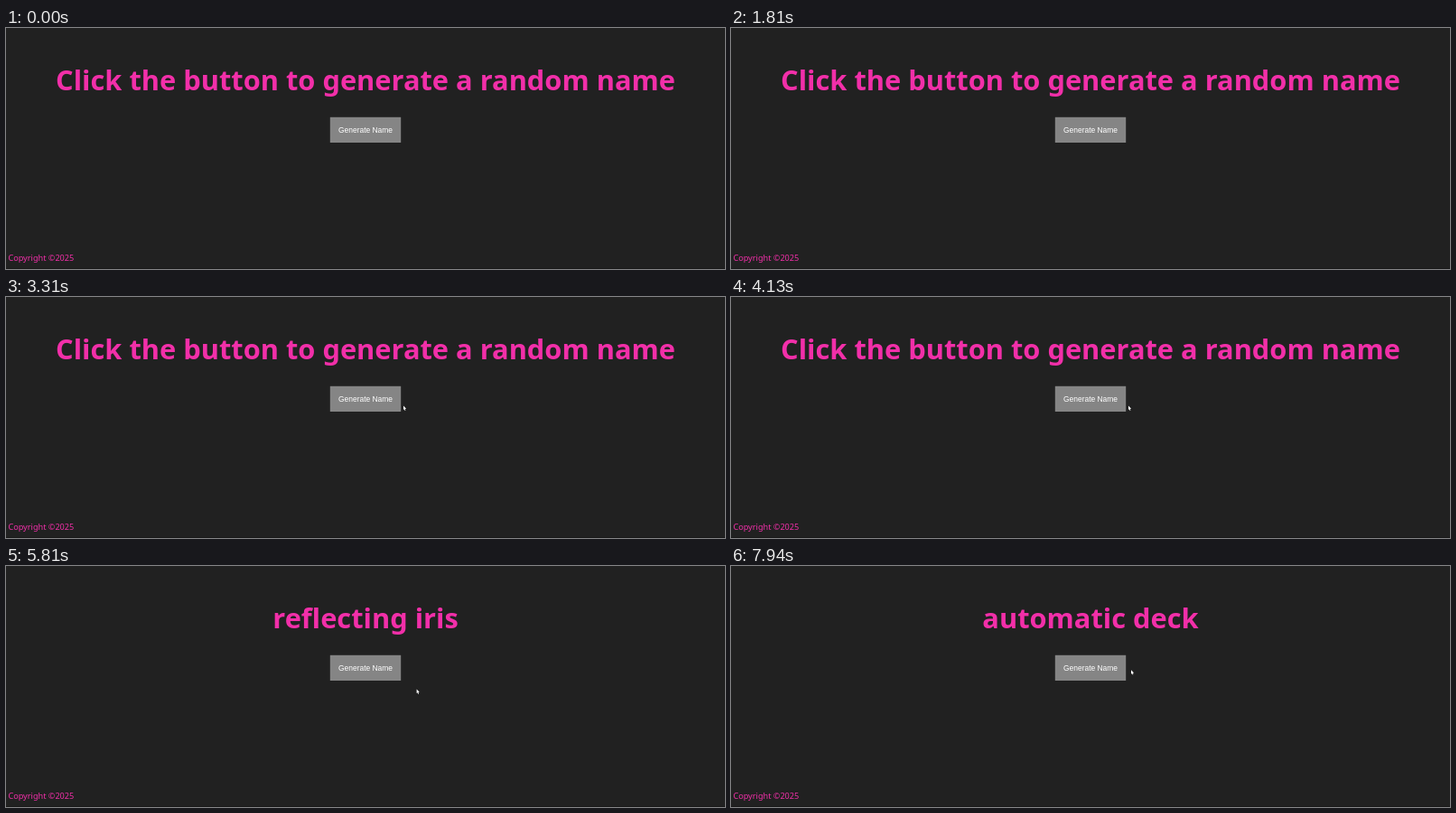
These frames come from a looping animation (796x267 px, 8 s). An HTML page with a canvas:

```html
<!DOCTYPE html>
<html lang="en">
<head>
<meta charset="utf-8">
<title>Random name generator</title>
<style>
  html, body { margin: 0; width: 100%; height: 100%; overflow: hidden; background: #212121; }
  canvas { display: block; }
</style>
</head>
<body>
<canvas id="stage" width="796" height="267"></canvas>
<script>
const ctx = document.getElementById("stage").getContext("2d");
const WIDTH = 796, HEIGHT = 267, CENTER = WIDTH / 2;
const LOOP = 8000, STEP = LOOP / 128;
const PINK = "#f22fa9";
const SANS = "'Noto Sans', 'Open Sans', sans-serif";
const button = { x: 358.8, y: 98.8, w: 78.4, h: 28.2 };

const ENTER = 2700, FIRST_CLICK = 5187, SECOND_CLICK = 7500;
const entry = { x: 520, y: 226 };
const moves = [
  { start: ENTER, length: 500, x: 440, y: 120.5 },
  { start: 4200, length: 600, x: 429.8, y: 118.5 },
  { start: 5440, length: 360, x: 456, y: 137.5 },
  { start: 6300, length: 600, x: 428, y: 111.5 },
  { start: 7560, length: 340, x: 443, y: 115.2 }
];

const smooth = u => u * u * (3 - 2 * u);
const mix = (a, b, k) => a + (b - a) * k;

function pointerAt(t) {
  return moves.reduce((from, to) => {
    const k = smooth(Math.min(1, Math.max(0, (t - to.start) / to.length)));
    return { x: mix(from.x, to.x, k), y: mix(from.y, to.y, k) };
  }, entry);
}

function titleAt(t) {
  if (t < FIRST_CLICK) return "Click the button to generate a random name";
  return t < SECOND_CLICK ? "reflecting iris" : "automatic deck";
}

function text(str, x, y, font, color, align = "center") {
  ctx.font = font;
  ctx.fillStyle = color;
  ctx.textAlign = align;
  ctx.fillText(str, x, y);
}

function arrowShape() {
  const shape = new Path2D("M0 0V4.6L1 3.8 1.7 5.4 2.4 5 1.8 3.5 3.1 3.3Z");
  return shape;
}

function handShape() {
  const shape = new Path2D();
  shape.roundRect(0, 0, 1.1, 4, 0.5);
  shape.roundRect(-0.6, 2.5, 3.6, 3.6, 1);
  return shape;
}

const arrow = arrowShape(), hand = handShape();

function drawPointer({ x, y }) {
  const overButton = x > button.x && x < button.x + button.w &&
                     y > button.y && y < button.y + button.h;
  const shape = overButton ? hand : arrow;
  ctx.save();
  ctx.translate(x, y);
  ctx.lineWidth = 0.6;
  ctx.strokeStyle = "#222";
  ctx.stroke(shape);
  ctx.fillStyle = "#fff";
  ctx.fill(shape);
  ctx.restore();
}

function draw(t) {
  ctx.fillStyle = "#212121";
  ctx.fillRect(0, 0, WIDTH, HEIGHT);
  ctx.fillStyle = "#181818";
  ctx.fillRect(0, HEIGHT - 1, WIDTH, 1);

  text(titleAt(t), CENTER, 69, `bold 30.8px ${SANS}`, PINK);

  ctx.fillStyle = "#858585";
  ctx.fillRect(button.x, button.y, button.w, button.h);
  text("Generate Name", CENTER, 115.6, "8.45px 'Liberation Sans', Arial, sans-serif", "#fff");
  text("Copyright ©2025", 2.4, 258, `9.13px ${SANS}`, PINK, "left");

  if (t >= ENTER) drawPointer(pointerAt(t));
}

const start = performance.now();
function tick() {
  const t = (performance.now() - start) % LOOP;
  draw(Math.floor(t / STEP) * STEP);
  requestAnimationFrame(tick);
}
tick();
</script>
</body>
</html>
```
